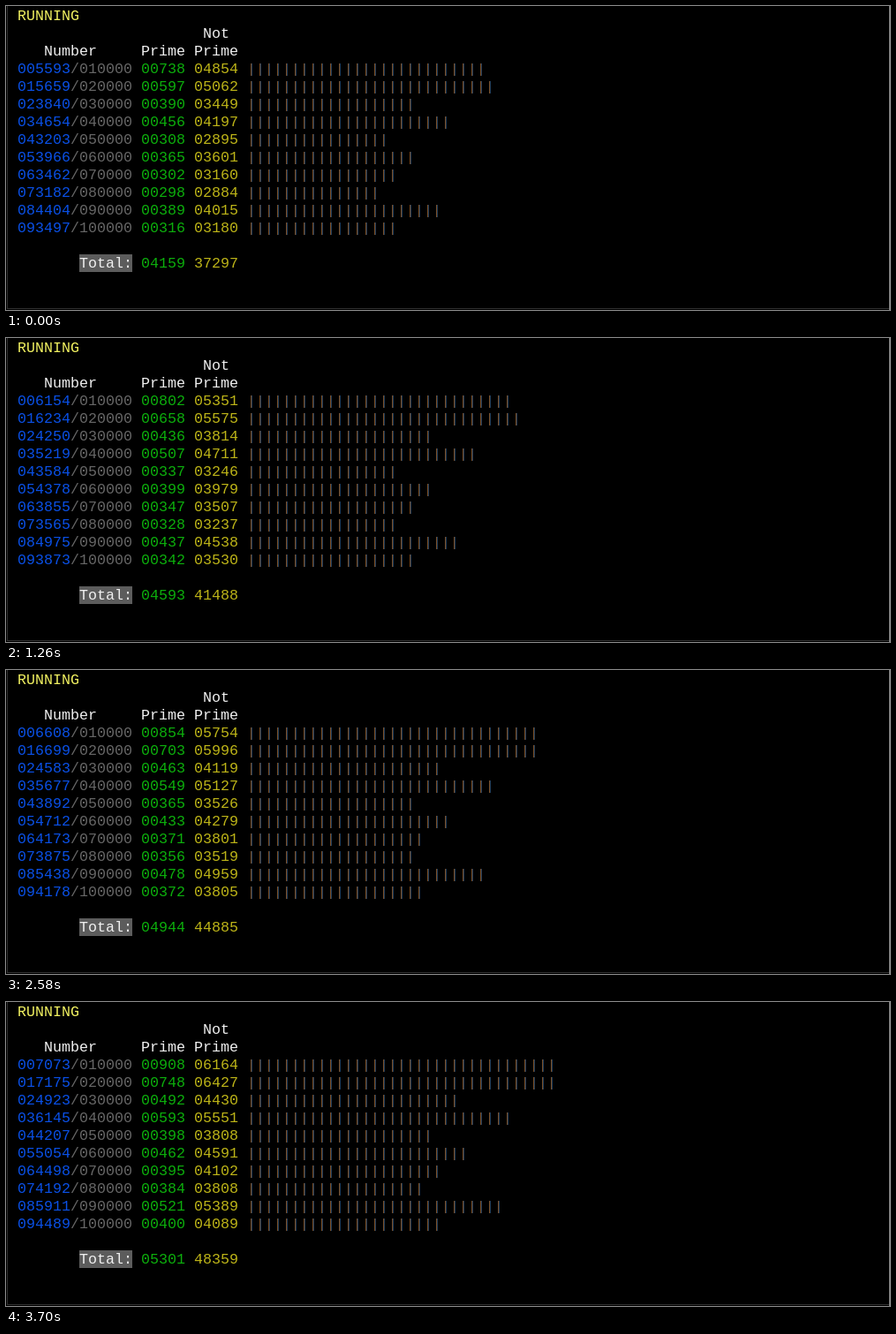
An HTML page with a canvas that plays this animation: 1001 px wide and 344 px high, repeating every 3800 ms.

```html
<!DOCTYPE html>
<html lang="en">
<head>
<meta charset="utf-8">
<title>Prime counter</title>
<style>
  html, body { margin: 0; width: 100%; height: 100%; overflow: hidden; background: #000; }
  canvas { display: block; }
</style>
</head>
<body>
<canvas id="screen" width="1001" height="344"></canvas>
<script>
const ctx = document.getElementById('screen').getContext('2d');
const LOOP = 3800, REPAINT = 136, SPAN = 10000, CELL = 10, LINE = 20;

// Shared pace of the workers: [time in ms, part of the way done]
const pace = [[0, 0], [540, .159], [1260, .379], [1930, .57], [2580, .686], [3260, .862], [3700, 1]];

// First and last progress of each worker; a half means the next number is still being tested
const workers = [
  [5592.5, 7072.5], [5659, 7175], [3839.5, 4922.5], [4653.5, 6144.5], [3203, 4206.5],
  [3966, 5053.5], [3462, 4497.5], [3182, 4192], [4404, 5910.5], [3496.5, 4489]
];

// primesUpTo[n] is the number of primes not above n
const primesUpTo = [0, 0];
const composite = new Uint8Array(10 * SPAN + 1);
for (let n = 2; n < composite.length; n++) {
  primesUpTo[n] = primesUpTo[n - 1] + !composite[n];
  if (!composite[n]) for (let m = n * n; m < composite.length; m += n) composite[m] = 1;
}

const pad = (n, width) => String(n).padStart(width, '0');

function rect(x, y, w, h, color) {
  ctx.fillStyle = color;
  ctx.fillRect(x, y, w, h);
}

function write(text, col, row, color = '#f0f0f0') {
  ctx.fillStyle = color;
  ctx.fillText(text, 13 + col * CELL, 16 + row * LINE);
}

function writeCounts(prime, other, row) {
  write(pad(prime, 5), 14, row, '#0cae0c');
  write(pad(other, 5), 20, row, '#bdb418');
}

// Progress moves in equal repaints between two points of the pace
function progressAt(time) {
  const next = pace.findIndex(([t]) => t > time);
  if (next < 0) return 1;
  const [t0, p0] = pace[next - 1], [t1, p1] = pace[next];
  const steps = Math.round((t1 - t0) / REPAINT);
  const step = Math.floor((time - t0) / (t1 - t0) * steps);
  return p0 + (p1 - p0) * step / steps;
}

function draw(progress) {
  rect(0, 0, 1001, 344, '#000');
  rect(1, 0, 1, 343, '#303030');
  rect(1, 342, 1000, 1, '#303030');
  rect(1000, 0, 1, 344, '#909090');
  ctx.font = '16.66px "Liberation Mono", "Courier New", monospace';

  write('RUNNING', 0, 0, '#f0f060');
  write('Not', 21, 1);
  write('Number', 3, 2);
  write('Prime', 14, 2);
  write('Prime', 20, 2);

  let primeSum = 0, otherSum = 0;
  workers.forEach(([first, last], i) => {
    const row = i + 3, start = i * SPAN;
    const at = Math.round(2 * (first + (last - first) * progress)) / 2;
    const done = Math.floor(at);
    const prime = primesUpTo[start + done] - primesUpTo[start];
    primeSum += prime;
    otherSum += done - prime;

    write(pad(start + Math.ceil(at), 6), 0, row, '#0a50e6');
    write('/' + pad(start + SPAN, 6), 6, row, '#666');
    writeCounts(prime, done - prime, row);

    // Each bar has a warm left and a cool right edge
    for (let b = 0; b < Math.floor(done / 200); b++) {
      const x = 277 + b * CELL, y = 5 + row * LINE;
      rect(x, y, 1, 14, '#7a4f28');
      rect(x + 1, y, 1, 14, '#1f3c5a');
    }
  });

  rect(83, 281, 60, 20, '#5c5c5c');
  write('Total:', 7, 14);
  writeCounts(primeSum, otherSum, 14);
}

function frame() {
  draw(progressAt(performance.now() % LOOP));
  requestAnimationFrame(frame);
}
frame();
</script>
</body>
</html>
```
